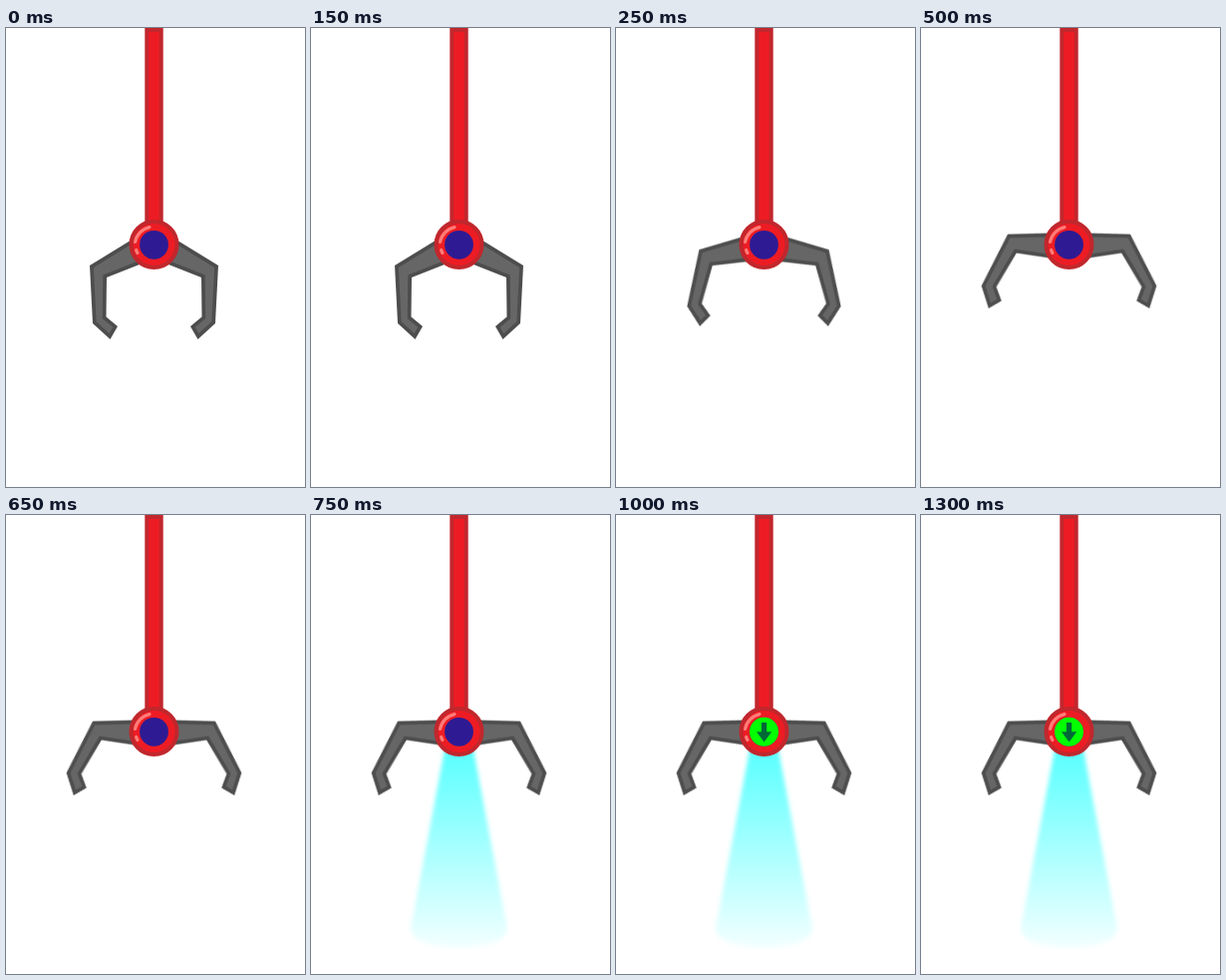
Animation, 300 px wide and 460 px high, one loop 1.5 s. Source, as an HTML page:

```html
<!DOCTYPE html>
<html lang="en">
<head>
<meta charset="utf-8">
<title>Claw</title>
<style>
  html, body { margin: 0; width: 100%; height: 100%; overflow: hidden; background: #fff; }
  svg { display: block; width: 300px; height: 460px; }

  .arm, .beam, .signal { animation: 1500ms step-end infinite; }
  .arm { transform-origin: 144px 228px; animation-name: open; }
  .beam { animation-name: shine; }
  .signal { animation-name: light; }

  .red { fill: #ed1c24; stroke: #c1272d; stroke-width: 4; }
  .metal { fill: #666; stroke: #4d4d4d; stroke-width: 7.4; clip-path: url(#armClip); }
  .gloss { fill: none; stroke: #ff7c78; stroke-width: 3.2; stroke-linecap: round; }

  @keyframes open {
    0% { transform: rotate(0deg); }
    16.6667% { transform: rotate(15deg); }
    33.3333%, 100% { transform: rotate(30deg); }
  }
  @keyframes shine {
    0% { opacity: 0; }
    50%, 100% { opacity: 1; }
  }
  @keyframes light {
    0% { opacity: 0; }
    66.6667%, 100% { opacity: 1; }
  }
</style>
</head>
<body>
<svg viewBox="0 0 300 460">
  <defs>
    <path id="armShape" d="M84 238 L135 206.8 L148 231.5 L101 250 L100.5 289.5 L112 299 L104.5 312 L87 296 Z"/>
    <clipPath id="armClip"><use href="#armShape"/></clipPath>
    <linearGradient id="beamFill" gradientUnits="userSpaceOnUse" x1="0" y1="235" x2="0" y2="436">
      <stop offset="0" stop-color="#0ff" stop-opacity=".65"/>
      <stop offset="1" stop-color="#0ff" stop-opacity=".04"/>
    </linearGradient>
    <filter id="soft" filterUnits="userSpaceOnUse" x="80" y="210" width="140" height="245">
      <feGaussianBlur stdDeviation="2"/>
    </filter>
  </defs>

  <path class="beam" fill="url(#beamFill)" filter="url(#soft)"
        d="M136 225 H161 L197 415 C195 440 102 440 100 415 Z"/>

  <g class="arm"><use class="metal" href="#armShape"/></g>
  <g transform="translate(297 0) scale(-1 1)">
    <g class="arm"><use class="metal" href="#armShape"/></g>
  </g>

  <rect class="red" x="141.3" y="2" width="14.4" height="215"/>
  <circle class="red" cx="148.5" cy="217" r="23"/>
  <path class="gloss" d="M129.5 214.5 A19.2 19.2 0 0 1 144 199.6"/>
  <path class="gloss" d="M130.6 222.5 Q131 224 132 225.5"/>
  <circle cx="148.5" cy="217.3" r="14.4" fill="#2e1b93"/>

  <g class="signal">
    <circle cx="148.5" cy="217.3" r="14.5" fill="#0f0"/>
    <path fill="#006837" d="M146 208 H151.2 V217.3 H156.2 L148.6 227.5 L141 217.3 H146 Z"/>
  </g>
</svg>
</body>
</html>
```
